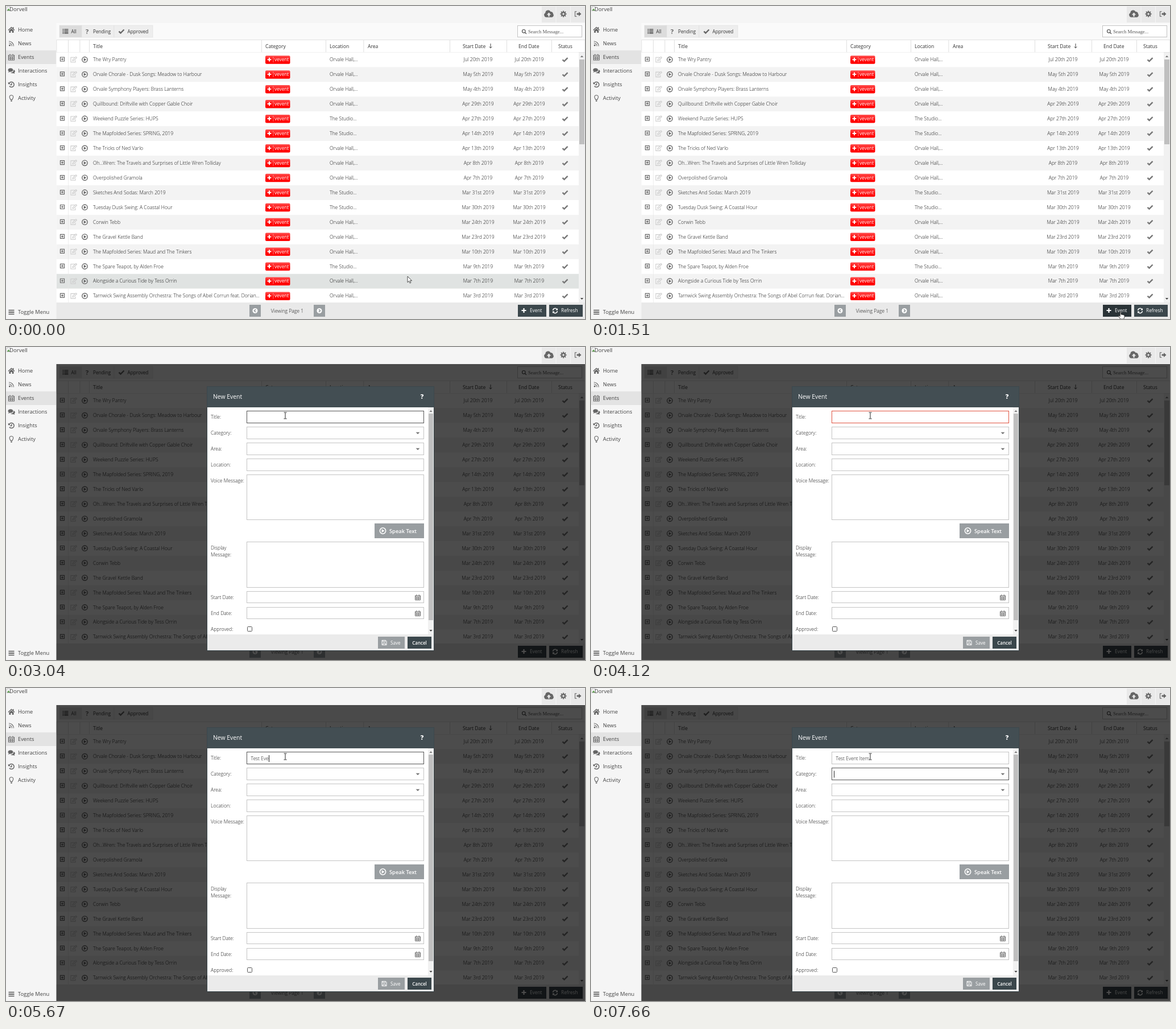
An HTML page that plays this animation: 1018 by 550 pixels, repeating every 8 s.

```html
<!DOCTYPE html>
<html lang="en">
<head>
<meta charset="utf-8">
<title>New event</title>
<style>
  html, body { margin: 0; width: 100%; height: 100%; overflow: hidden; background: #f5f5f5; }
  svg { display: block; font-family: "Open Sans", sans-serif; }
  text { white-space: pre; }
</style>
</head>
<body>
<svg id="stage" width="1018" height="550" viewBox="0 0 1018 550"></svg>
<script>
const LOOP = 8000, DARK = '#3b474c', PRESSED = '#2a3337', GREY = '#999ea1', INK = '#444';

const rect = (x, y, w, h, fill, extra = '') =>
  `<rect x="${x}" y="${y}" width="${w}" height="${h}" fill="${fill}" ${extra}/>`;
const box = (x, y, w, h, stroke = '#c4c4c4', extra = '') =>
  rect(x + .5, y + .5, w - 1, h - 1, '#fff', `stroke="${stroke}" ${extra}`);
const text = (x, y, s, { size = 8.6, fill = '#333', weight = 400, anchor = 'start', extra = '' } = {}) =>
  `<text x="${x}" y="${y}" font-size="${size}" fill="${fill}" font-weight="${weight}" text-anchor="${anchor}" ${extra}>${s}</text>`;
const light = (x, y, s, opts) => text(x, y, s, { weight: 300, fill: '#111', ...opts });

// Icons are centred on 0,0. "fill" paths are solid, "line" paths are stroked.
const icons = {
  home: { fill: 'M-6 0L0-5.5L2.5-3.2V-5H4V-1.8L6 0L5 1L0-3.5L-5 1ZM-4 1L0-2.5L4 1V5H1.2V2H-1.2V5H-4Z' },
  rss: { fill: 'M-4.5 3a1.5 1.5 0 1 0 3 0a1.5 1.5 0 1 0-3 0', line: 'M-4.5-1A5.5 5.5 0 0 1 1 4.5M-4.5-4A8.5 8.5 0 0 1 4 4.5' },
  calendar: { line: 'M-5-3.5H5V5H-5ZM-5-1H5M-5 2H5M-1.7-1V5M1.7-1V5M-2.5-5.5V-3M2.5-5.5V-3' },
  chat: { fill: 'M-6-1.5C-6-6 3-6 3-1.5C3 1-1 2-2.5 1.6L-5.5 3L-4.6 .8Q-6 0-6-1.5ZM4-2C7-1 7 2 5 3L6 5L3 4Q0 4.5-1.5 3Q4 3 4-2Z' },
  history: { line: 'M-4-2.2A4.6 4.6 0 1 1-3.6 2.8M.3-2.6V.6H-2.2', fill: 'M-5.6-4.6V-.8H-1.8Z', w: 1.5 },
  bulb: { line: 'M-1.5 2.5C-1.5 1-3.3 0-3.3-2A3.3 3.3 0 0 1 3.3-2C3.3 0 1.5 1 1.5 2.5ZM-1.5 4H1.5M-1 5.4H1' },
  cloud: { fill: 'M-4 4.5A3.2 3.2 0 0 1-5-1.5A4 4 0 0 1 2.5-3.2A3.2 3.2 0 0 1 6 0A2.7 2.7 0 0 1 4.5 4.5ZM0-2L-3 1.2H-1V3.5H1V1.2H3Z' },
  gear: { line: 'M-2.8 0a2.8 2.8 0 1 0 5.6 0a2.8 2.8 0 1 0-5.6 0M0-5.5V-3M0 3V5.5M-5.5 0H-3M3 0H5.5M-3.9-3.9L-2-2M2 2L3.9 3.9M-3.9 3.9L-2 2M2-2L3.9-3.9', w: 2.1 },
  exit: { fill: 'M-2-1.5H1.5V-4L6 0L1.5 4V1.5H-2Z', line: 'M-2-4.3H-5V4.3H-2' },
  bars: { line: 'M-5-3.5H-3M-2-3.5H5M-5-1.2H-3M-2-1.2H5M-5 1.1H-3M-2 1.1H5M-5 3.4H-3M-2 3.4H5', w: 1.6 },
  menu: { line: 'M-5-3.4H5M-5 0H5M-5 3.4H5', w: 1.8 },
  check: { line: 'M-4.5 .2L-1.5 3L4.5-3', w: 2.4 },
  search: { line: 'M-3.5-.7a2.8 2.8 0 1 0 5.6 0a2.8 2.8 0 1 0-5.6 0M1.4 1.4L4 4' },
  expand: { line: 'M-3.5-3.5H3.5V3.5H-3.5ZM-2 0H2M0-2V2', w: 1.2 },
  edit: { line: 'M2-4H-5V4.5H3V1M-2 2L-1.5 0L4-5L5.5-3.5L0 1.7Z' },
  play: { fill: 'M-1.7-2.7L2.8 0L-1.7 2.7Z', line: 'M-4.7 0a4.7 4.7 0 1 0 9.4 0a4.7 4.7 0 1 0-9.4 0', w: 1.4 },
  plus: { line: 'M-4 0H4M0-4V4', w: 2.2 },
  refresh: { line: 'M-4.4-.8A4.4 4.4 0 0 1 3.5-2.8M4.4 .8A4.4 4.4 0 0 1-3.5 2.8', fill: 'M5-5V-1H1ZM-5 5V1H-1Z', w: 1.6 },
  save: { line: 'M-4.5-4.5H3L4.5-3V4.5H-4.5ZM-2.5-4.5V-1.5H2V-4.5M-2.5 4.5V1.5H2.5V4.5' },
  left: { fill: 'M-4.5 0a4.5 4.5 0 1 0 9 0a4.5 4.5 0 1 0-9 0', mark: 'M1-2.4L-1.5 0L1 2.4' },
  right: { fill: 'M-4.5 0a4.5 4.5 0 1 0 9 0a4.5 4.5 0 1 0-9 0', mark: 'M-1-2.4L1.5 0L-1 2.4' },
  up: { fill: 'M-2.6 1.4L0-1.4L2.6 1.4Z' },
  down: { fill: 'M-2.6-1.4L0 1.4L2.6-1.4Z' },
};
const icon = (name, x, y, color = '#666', scale = 1) => {
  const { fill, line, mark, w = 1.1 } = icons[name];
  return `<g transform="translate(${x} ${y}) scale(${scale})">` +
    (fill ? `<path d="${fill}" fill="${color}" fill-rule="evenodd"/>` : '') +
    (line ? `<path d="${line}" fill="none" stroke="${color}" stroke-width="${w}"/>` : '') +
    (mark ? `<path d="${mark}" fill="none" stroke="${GREY}" stroke-width="1.7"/>` : '') + '</g>';
};

const events = [
  ['The Wry Pantry', 'Jul 20th'],
  ['Orvale Chorale - Dusk Songs: Meadow to Harbour', 'May 5th'],
  ['Orvale Symphony Players: Brass Lanterns', 'May 4th'],
  ['Quillbound: Driftville with Copper Gable Choir', 'Apr 29th'],
  ['Weekend Puzzle Series: HUPS', 'Apr 27th', 1],
  ['The Mapfolded Series: SPRING, 2019', 'Apr 14th', 1],
  ['The Tricks of Ned Varlo', 'Apr 13th'],
  ['Oh...Wren: The Travels and Surprises of Little Wren Tolliday', 'Apr 8th'],
  ['Overpolished Gramola', 'Apr 7th'],
  ['Sketches And Sodas: March 2019', 'Mar 31st', 1],
  ['Tuesday Dusk Swing: A Coastal Hour', 'Mar 30th', 1],
  ['Corwin Tebb', 'Mar 24th'],
  ['The Gravel Kettle Band', 'Mar 23rd'],
  ['The Mapfolded Series: Maud and The Tinkers', 'Mar 10th'],
  ['The Spare Teapot, by Alden Froe', 'Mar 9th', 1],
  ['Alongside a Curious Tide by Tess Orrin', 'Mar 7th'],
  ['Tarnwick Swing Assembly Orchestra: The Songs of Abel Corrun feat. Dorian...', 'Mar 3rd'],
];
const PITCH = 25.95, HOVERED = 15;

function eventRow([title, day, studio], i) {
  const top = 81.5 + i * PITCH, y = top + 12.7, base = y + 3;
  const date = x => light(x, base, day + ' 2019', { anchor: 'middle' });
  return rect(89, top, 918, PITCH, i % 2 ? '#f3f3f3' : '#fff', i === HOVERED ? 'id="hovered"' : '') +
    rect(109, top, .7, PITCH, '#e6e6e6') +
    icon('expand', 99, y - .7) + icon('edit', 119, y, '#ccc') + icon('play', 138.5, y) +
    light(153, base, title) +
    rect(456, y - 7, 43.5, 14.5, 'url(#badge)', 'rx="2"') + icon('plus', 463, y, '#fff', .85) +
    rect(469.5, y - 5, .8, 10, '#ffa0a0') + text(472, base, 'vevent', { size: 8.2, fill: '#fff' }) +
    light(569, base, studio ? 'The Studio...' : 'Orvale Hall,...') +
    date(830) + date(920) + icon('check', 983, y, '#777');
}

function scrollbar(x, y, w, h, thumbY, thumbH) {
  const mid = x + w / 2;
  return rect(x, y, w, h, '#f1f1f1') + rect(x + 1, thumbY, w - 2, thumbH, '#bfbfbf') +
    icon('up', mid, y + 6.5, '#777') + icon('down', mid, y + h - 6.5, '#444');
}

function sidebar() {
  const items = [['home', 'Home'], ['rss', 'News'], ['calendar', 'Events'], ['chat', 'Interactions'], ['history', 'Insights'], ['bulb', 'Activity']];
  const item = (name, label, y) => icon(name, 9.5, y) + text(21, y + 3.4, label, { size: 9.3, fill: INK });
  const tools = [['cloud', 1.25], ['gear', 1], ['exit', 1]];
  return rect(0, 0, 1018, 550, '#f5f5f5') + rect(0, 78, 88, 24, '#e3e3e3') +
    items.map(([name, label], i) => item(name, label, 42 + i * 24)).join('') + item('menu', 'Toggle Menu', 538) +
    rect(1.5, 1.5, 6, 7, '#fff', 'stroke="#aaa" stroke-width=".7"') + `<path d="M2 8L4.5 4L7 8Z" fill="#5a9a4c"/>` +
    text(6, 9, 'Dorvell', { size: 9.6, fill: INK }) +
    tools.map(([name, scale], i) => rect(942 + i * 25.5, 1, 24.5, 28, '#e9e9e9') + icon(name, 954.5 + i * 25.5, 14, '#666', scale)).join('');
}

function listing() {
  const tab = (x, w, fill) => rect(x, 34, w, 21, fill, 'stroke="#dcdcdc" stroke-width=".6"');
  const small = { size: 8.2 };
  const heads = [['Title', 153], ['Category', 456], ['Location', 569], ['Area', 636], ['Start Date', 803], ['End Date', 901], ['Status', 971]];
  return rect(88.5, 30, 930, 520, '#fafafa') +
    tab(94, 39, '#dcdcdc') + icon('bars', 104.5, 44.5) + text(114.5, 47.6, 'All', small) +
    tab(133, 57, '#eee') + text(140, 48.5, '?', { size: 11, weight: 700, fill: '#666' }) + text(153, 47.6, 'Pending', small) +
    tab(190, 68, '#eee') + icon('check', 203, 44.5) + text(213.5, 47.6, 'Approved', small) +
    box(899, 34, 114, 21) + icon('search', 911, 45, '#444') +
    text(918, 48, 'Search Message...', { fill: '#555', extra: 'font-family="Liberation Serif, serif"' }) +
    rect(89, 59.5, 929, 22, '#fff', 'stroke="#ddd" stroke-width=".8"') +
    [109, 129.5, 146, 449, 562, 628.5, 780, 880, 959].map(x => rect(x, 60, .8, 21, '#d8d8d8')).join('') +
    heads.map(([label, x]) => text(x, 74, label)).join('') +
    `<path d="M852 66V74M849.8 71.5L852 74L854.2 71.5" fill="none" stroke="#444"/>` +
    events.map(eventRow).join('') + scrollbar(1007, 82, 11, 439, 94, 149) +
    rect(88.5, 521, 930, 29, '#e9e9e9') +
    rect(428, 525, 20, 21, GREY) + icon('left', 438, 535.5, '#fff') +
    rect(541, 525, 20, 21, GREY) + icon('right', 551, 535.5, '#fff') +
    light(494.5, 538.5, 'Viewing Page 1', { anchor: 'middle' }) +
    rect(900, 525, 50, 21, DARK, 'id="addButton"') + icon('plus', 910.5, 535, '#fff') + text(921, 538.3, 'Event', { size: 8.3, fill: '#fff' }) +
    rect(955, 525, 59, 21, DARK) + icon('refresh', 965.5, 535.5, '#fff', .9) + text(976, 538.3, 'Refresh', { size: 8.3, fill: '#fff' });
}

function dialog() {
  const labels = [['Title:', 123], ['Category:', 151], ['Area:', 179], ['Location:', 207], ['Voice Message:', 235], ['Display', 353],
    ['Message:', 364.5], ['Start Date:', 440], ['End Date:', 468], ['Approved:', 496]];
  return rect(88.5, 30, 930, 520, '#000', 'opacity=".7"') +
    rect(353, 69, 400, 465, DARK) + rect(354, 106, 398, 399, '#fff') + rect(354, 505, 398, 28, '#ebebeb') +
    rect(354, 70, 398, 36, '#434e53') + text(364, 91, 'New Event', { size: 10.4, fill: '#fff' }) +
    text(731.5, 91, '?', { size: 11, weight: 800, fill: '#fff', anchor: 'middle' }) +
    labels.map(([s, y]) => light(360, y + 3.2, s)).join('') +
    box(423, 112, 312, 22, '#c4c4c4', 'id="titleBox"') + box(423, 140, 312, 22, '#c4c4c4', 'id="categoryBox"') +
    box(423, 168, 312, 22) + box(423, 196, 312, 22) + box(423, 224, 312, 80) + box(423, 342, 312, 81) +
    box(423, 429, 312, 21) + box(423, 457, 312, 21) +
    icon('down', 724, 151.5, '#777', 1.3) + icon('down', 724, 179.5, '#777', 1.3) +
    icon('calendar', 724, 440, '#666', .9) + icon('calendar', 724, 468, '#666', .9) +
    rect(424.5, 491.5, 8, 8, '#fff', 'stroke="#555" rx="1"') +
    rect(648, 310, 87, 26, GREY) + icon('play', 662.5, 323, '#fff', 1.1) + text(674, 326.5, 'Speak Text', { size: 9.3, fill: '#fff', weight: 600 }) +
    rect(654, 509, 47, 21, GREY) + icon('save', 665, 519.5, '#fff', .9) + text(676, 522.5, 'Save', { size: 8.1, fill: '#fff' }) +
    rect(706, 509, 42, 21, DARK) + text(727, 522.5, 'Cancel', { size: 8, fill: '#fff', weight: 600, anchor: 'middle' }) +
    scrollbar(742, 106, 10, 399, 117, 363) +
    light(430.5, 126.6, '', { extra: 'id="typed"' }) + rect(431, 118, 1, 12, '#222', 'id="caret"');
}

const pointers = {
  arrow: '<path d="M0 0V10.6L2.5 8.3L4.1 12L5.9 11.2L4.3 7.7H7.6Z" fill="#fff" stroke="#222" stroke-width=".8"/>',
  hand: '<path d="M-.8 .9Q0-.5 .9 .9V5L2.8 5.2L5 5.7L7 6.4V9.5L5.7 13H-.2L-3.4 8.2Q-3.5 6.8-2.2 7.2L-.8 8.6Z" fill="#fff" stroke="#222" stroke-width=".8"/>',
  beam: '<path d="M-2.5-5.5H-.6L0-5L.6-5.5H2.5M0-5V5M-2.5 5.5H-.6L0 5L.6 5.5H2.5" fill="none" stroke="#222"/>',
};

const gradient = '<linearGradient id="badge" x2="0" y2="1"><stop stop-color="#ff5050"/>' +
  '<stop offset=".6" stop-color="#f00"/></linearGradient>';

const stage = document.getElementById('stage');
stage.innerHTML = gradient + sidebar() + listing() + `<g id="dialog">${dialog()}</g>` +
  Object.entries(pointers).map(([name, shape]) => `<g id="${name}">${shape}</g>`).join('');
const $ = id => document.getElementById(id);
const show = (el, on) => el.setAttribute('visibility', on ? 'visible' : 'hidden');

// time, pointer, x, y
const pointerSteps = [
  [0, 'arrow', 706, 475], [140, 'arrow', 708, 487], [300, '', 0, 0],
  [760, 'hand', 930, 546], [910, 'hand', 930, 541], [1050, 'hand', 930, 537], [1370, 'hand', 931, 537],
  [1660, 'arrow', 931, 537], [1810, 'arrow', 885, 440], [1960, 'arrow', 700, 240],
  [2110, 'arrow', 545, 137], [2270, 'beam', 496, 122], [2430, 'beam', 491, 120.5],
];
// time, typed text, title border, caret shown
const IDLE = '#c4c4c4', FOCUS = '#555', ERROR = '#e0523f';
const titleSteps = [
  [0, '', IDLE, 0], [2580, '', FOCUS, 1], [3040, '', FOCUS, 0], [3500, '', ERROR, 1], [3980, 'T', ERROR, 1], [4120, '', ERROR, 0],
  [4600, 'T', FOCUS, 1], [4750, 'Te', FOCUS, 1], [4910, 'Test', FOCUS, 1], [5060, 'Test ', FOCUS, 1],
  [5370, 'Test E', FOCUS, 1], [5520, 'Test Ev', FOCUS, 1], [5670, 'Test Eve', FOCUS, 1],
  [6280, 'Test Even', FOCUS, 1], [6440, 'Test Event', FOCUS, 1],
  [6910, 'Test Event I', FOCUS, 1], [7060, 'Test Event It', FOCUS, 1], [7200, 'Test Event Ite', FOCUS, 1],
  [7350, 'Test Event Item', FOCUS, 1], [7660, 'Test Event Item', IDLE, 1],
];
const at = (steps, t) => steps.findLast(step => step[0] <= t);

function draw(now) {
  const t = now % LOOP, open = t >= 1660, onCategory = t >= 7660;
  $('hovered').setAttribute('fill', t < 300 ? '#e0e3e2' : '#f3f3f3');
  $('addButton').setAttribute('fill', t >= 1370 && t < 1810 ? PRESSED : DARK);
  $('dialog').style.display = open ? '' : 'none';

  const [, pointer, x, y] = at(pointerSteps, t);
  for (const name in pointers) show($(name), name === pointer);
  if (pointer) $(pointer).setAttribute('transform', `translate(${x} ${y})`);

  if (open) {
    const [, typed, border, caretOn] = at(titleSteps, t);
    $('typed').textContent = typed;
    $('titleBox').setAttribute('stroke', border);
    $('categoryBox').setAttribute('stroke', onCategory ? FOCUS : IDLE);
    const end = typed ? Math.round(430.5 + $('typed').getComputedTextLength()) : 431;
    $('caret').setAttribute('x', onCategory ? 427 : end);
    $('caret').setAttribute('y', onCategory ? 145.5 : 118);
    $('caret').style.display = caretOn ? '' : 'none';
  }
  requestAnimationFrame(draw);
}
requestAnimationFrame(draw);
</script>
</body>
</html>
```
